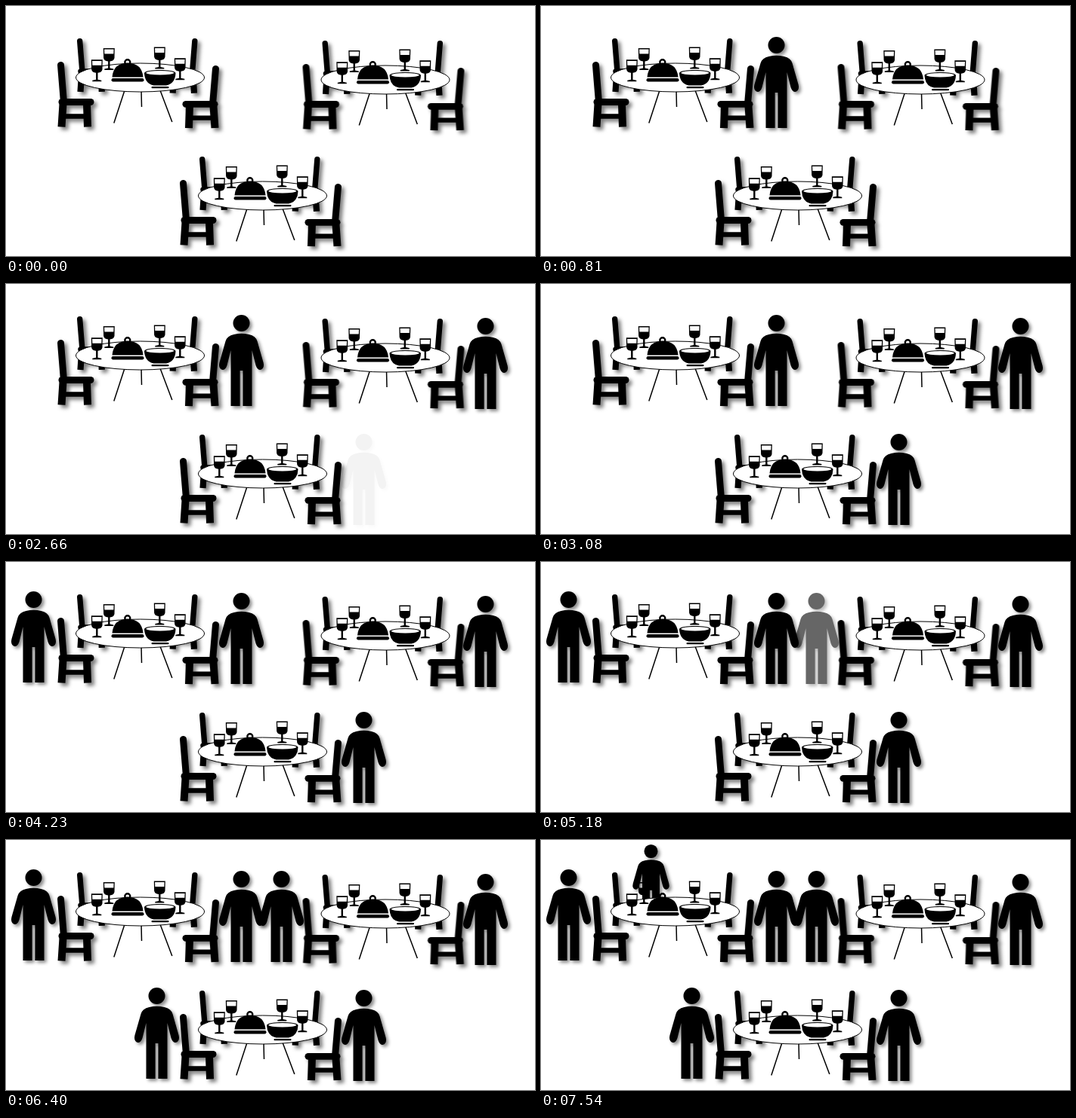
An HTML page for the animation above (8000 ms loop, 700 by 332 pixels).

```html
<!DOCTYPE html>
<html lang="en">
<head>
<meta charset="utf-8">
<title>Guests arriving at three tables</title>
<style>
  html, body { margin: 0; width: 100%; height: 100%; overflow: hidden; background: #fff; }
  svg { display: block; }
  .shadow { filter: drop-shadow(3px 3px 2px rgba(0, 0, 0, .45)); }
  .deep { filter: drop-shadow(4px 4px 2.5px rgba(0, 0, 0, .5)); }
  .line { fill: none; stroke: #000; }
</style>
</head>
<body>
<svg id="stage" width="700" height="332" viewBox="0 0 700 332">
  <defs>
    <g id="chair" class="line">
      <path d="M4.5 4.5L8.5 54" stroke-width="9" stroke-linecap="round"/>
      <path d="M6 53.5H44" stroke-width="9" stroke-linecap="round"/>
      <path d="M7.5 56L5.5 86.5M39 56L40 86.5" stroke-width="10"/>
      <path d="M6 72.5H40" stroke-width="6.5"/>
    </g>
    <path id="glass" fill-rule="evenodd" d="M-7.5 0H7.5L7.2 13Q6.5 17 1.2 17.5V26.5L6 27.5V29H-6V27.5L-1.2 26.5V17.5Q-6.5 17 -7.2 13ZM-6.2 1.6L-6 7.5H6L6.2 1.6Z"/>
    <g id="person">
      <circle r="11"/>
      <path d="M-10 15Q0 12.5 10 15Q19 17 21 24L29 52Q31 60 25 62Q21 62 19 56L14 36V110H1.9V63H-1.9V110H-14V36L-19 56Q-21 62 -25 62Q-31 60 -29 52L-21 24Q-19 17 -10 15Z"/>
    </g>
    <g id="backChairs" class="deep">
      <use href="#chair" transform="translate(94 43) scale(.82)"/>
      <use href="#chair" transform="translate(253.5 43) scale(-.82 .84)"/>
    </g>
    <g id="table">
      <path class="line" stroke-width="1.5" d="M157 112L142.8 155.5M179 112L179.5 134M204 112L219.8 154"/>
      <ellipse cx="177.5" cy="95" rx="85" ry="19" fill="#fff" stroke="#000"/>
      <use href="#glass" x="136.3" y="56"/>
      <use href="#glass" x="120.3" y="71.3"/>
      <use href="#glass" x="203.3" y="54.5"/>
      <use href="#glass" x="230.3" y="69.3"/>
      <circle class="line" cx="160.8" cy="74.8" r="3.5" stroke-width="2.4"/>
      <path d="M140.5 94.5Q142 76 160.8 75.5Q180 76 181.5 94.5Z"/>
      <rect x="139.5" y="96" width="43" height="4.5" rx="2.2"/>
      <path d="M183 89C183 83.5 224.5 83.5 224.5 89Q224 103 212 105.5H195.5Q183.5 103 183 89Z"/>
      <ellipse cx="203.8" cy="88.8" rx="18.5" ry="2.8" fill="#fff"/>
      <rect x="192.5" y="107" width="23" height="2.2" rx="1"/>
      <g class="deep">
        <use href="#chair" x="68" y="74"/>
        <use href="#chair" transform="translate(282 79) scale(-1 .96)"/>
      </g>
    </g>
  </defs>
</svg>
<script>
  const LOOP = 8000;
  const tables = [[0, 0], [324.5, 3], [162, 157]];
  // head x, head y, fade start, fade end, scale
  const guests = [
    [311.5, 52, 480, 810, 1],
    [634.5, 56, 1580, 1970, 1],
    [473.5, 210, 2640, 3080, 1],
    [36.5, 50, 3820, 4230, 1],
    [364.5, 52, 4870, 5390, 1],
    [199.5, 207, 5930, 6400, 1],
    [145.5, 15, 7140, 7540, .82]
  ];

  const place = id => tables.map(([x, y]) => `<use href="#${id}" x="${x}" y="${y}"/>`).join('');
  const person = ([x, y, , , scale]) =>
    `<g class="guest"><g class="shadow"><use href="#person" transform="translate(${x} ${y}) scale(${scale})"/></g></g>`;

  // The last guest stands behind the first table.
  const stage = document.getElementById('stage');
  stage.insertAdjacentHTML('beforeend',
    place('backChairs') + person(guests[6]) + place('table') + guests.slice(0, 6).map(person).join(''));

  const [behind, ...front] = stage.querySelectorAll('.guest');
  const figures = [...front, behind];

  function draw() {
    const t = performance.now() % LOOP;
    guests.forEach(([, , start, end], i) => {
      figures[i].style.opacity = Math.min(1, Math.max(0, (t - start) / (end - start)));
    });
    requestAnimationFrame(draw);
  }
  draw();
</script>
</body>
</html>
```
